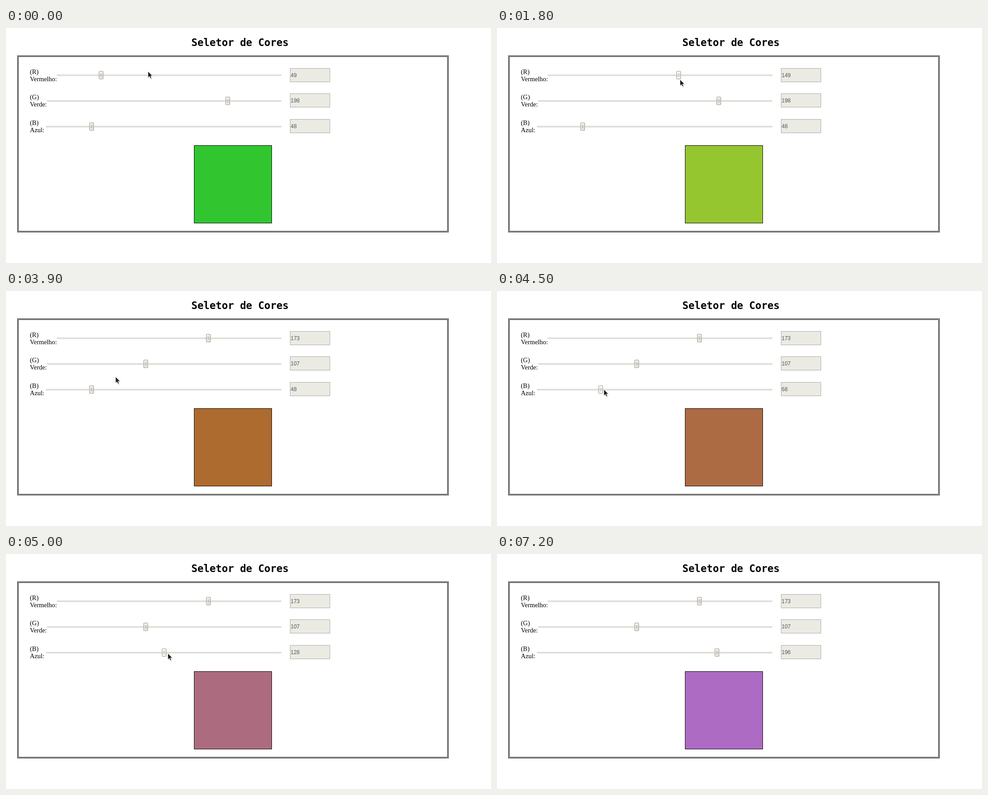
Animation, 1076 px wide and 521 px high, one loop 7300 ms. Source, as an HTML page:

```html
<!DOCTYPE html>
<html lang="pt">
<head>
<meta charset="utf-8">
<title>Seletor de Cores</title>
<style>
html, body { margin: 0; width: 100%; height: 100%; overflow: hidden; background: #fff; }
svg { display: block; width: 1076px; height: 521px; }
.title { font: bold 22.4px "DejaVu Sans Mono", monospace; }
.label { font: 14.4px "Liberation Serif", serif; }
.value { font: 12px "Liberation Sans", sans-serif; fill: #555; }
.frame { fill: none; stroke: #000; }
</style>
</head>
<body>
<svg id="stage" viewBox="0 0 1076 521">
  <defs>
    <linearGradient id="idle" x2="1" y2="1">
      <stop offset="0" stop-color="#f8f7f5"/><stop offset="1" stop-color="#e4e0db"/>
    </linearGradient>
    <linearGradient id="lit" x2="1" y2="1">
      <stop offset="0" stop-color="#fff"/><stop offset="1" stop-color="#f4f2f0"/>
    </linearGradient>
  </defs>
  <text class="title" x="411.3" y="40">Seletor de Cores</text>
  <rect class="frame" x="25.5" y="61.5" width="956" height="391"/>
  <rect class="frame" x="27.5" y="63.5" width="952" height="387"/>
  <g id="rows"></g>
  <rect id="swatch" x="417.5" y="260.5" width="172" height="172" stroke="#000"/>
  <g id="cursor">
    <path d="M1 2V16L4.2 13L6.5 18L9 17L6.7 12H11Z" fill="#000" opacity=".18"/>
    <path d="M0 0V14.2L3.2 11.2L5.6 16L8 15L5.8 10.2H10Z" fill="#1c1c1c" stroke="#fff" stroke-width=".9"/>
  </g>
</svg>
<script>
const LOOP = 7300, STEP = 100;
const NS = "http://www.w3.org/2000/svg";
const $ = id => document.getElementById(id);

function add(parent, tag, attrs, text) {
  const el = document.createElementNS(NS, tag);
  for (const k in attrs) el.setAttribute(k, attrs[k]);
  if (text) el.textContent = text;
  return parent.appendChild(el);
}

// keys: [time, value]; drag: first and last moment the handle is lit
const sliders = [
  { letter: "(R)", name: "Vermelho:", left: 112.5, y: 104.5, drag: [500, 2200],
    keys: [[500, 49], [800, 88], [1800, 149], [2200, 173]] },
  { letter: "(G)", name: "Verde:", left: 91, y: 161.3, drag: [2600, 3600],
    keys: [[2700, 198], [3100, 157], [3500, 107]] },
  { letter: "(B)", name: "Azul:", left: 88.5, y: 218, drag: [4200, 5600],
    keys: [[4300, 48], [4700, 87], [5500, 196]] }
];
const RIGHT = 611;

// [time, x, y]
const path = [
  [0, 315, 96], [400, 215, 102], [500, 214, 103], [800, 289, 107],
  [1800, 406, 114], [2200, 452, 112], [2600, 488, 156], [2700, 488, 158],
  [3100, 406, 159], [3500, 306, 162], [3900, 243, 190], [4200, 198, 215],
  [4300, 198, 217], [4700, 276, 219], [5500, 496, 222], [5900, 502, 245],
  [6400, 520, 205], [6900, 560, 8], [7000, 565, -22]
];

function at(keys, t, i = 1) {
  if (t <= keys[0][0]) return keys[0][i];
  for (let k = 1; k < keys.length; k++) {
    const a = keys[k - 1], b = keys[k];
    if (t <= b[0]) return a[i] + (b[i] - a[i]) * (t - a[0]) / (b[0] - a[0]);
  }
  return keys[keys.length - 1][i];
}

for (const s of sliders) {
  const g = add($("rows"), "g", {});
  const top = Math.round(s.y - 15);
  add(g, "text", { class: "label", x: 53, y: top + 12 }, s.letter);
  add(g, "text", { class: "label", x: 53, y: top + 27.5 }, s.name);
  add(g, "rect", { x: s.left, y: Math.round(s.y - 1.5), width: RIGHT - s.left,
    height: 3.5, rx: 1, fill: "#e0dcd6" });
  s.handle = add(g, "g", {});
  s.body = add(s.handle, "rect", { x: -4.5, y: -8.5, width: 9, height: 17, rx: .8, stroke: "#98908a" });
  add(s.handle, "path", { d: "M-2.5 -2.5h5M-2.5 0h5M-2.5 2.5h5", stroke: "#a09a94", fill: "none" });
  add(g, "rect", { x: 630.5, y: top - .5, width: 88, height: 30, fill: "#ebebe4", stroke: "#aaa9a5" });
  s.text = add(g, "text", { class: "value", x: 631.5, y: top + 19 });
}

function draw(t) {
  const rgb = sliders.map(s => {
    const v = Math.round(at(s.keys, t));
    const x = s.left + 4.5 + (RIGHT - s.left - 9) * v / 255;
    s.handle.setAttribute("transform", `translate(${Math.round(x)} ${Math.round(s.y - .5) + .5})`);
    const lit = t >= s.drag[0] && t <= s.drag[1];
    s.body.setAttribute("fill", lit ? "url(#lit)" : "url(#idle)");
    s.text.textContent = v;
    return v;
  });
  $("swatch").setAttribute("fill", `rgb(${rgb})`);
  const x = Math.round(at(path, t, 1)), y = Math.round(at(path, t, 2));
  $("cursor").setAttribute("transform", `translate(${x} ${y})`);
}

const start = performance.now();
function tick() {
  const t = (performance.now() - start) % LOOP;
  draw(Math.floor(t / STEP) * STEP);
  requestAnimationFrame(tick);
}
draw(0);
requestAnimationFrame(tick);
</script>
</body>
</html>
```
